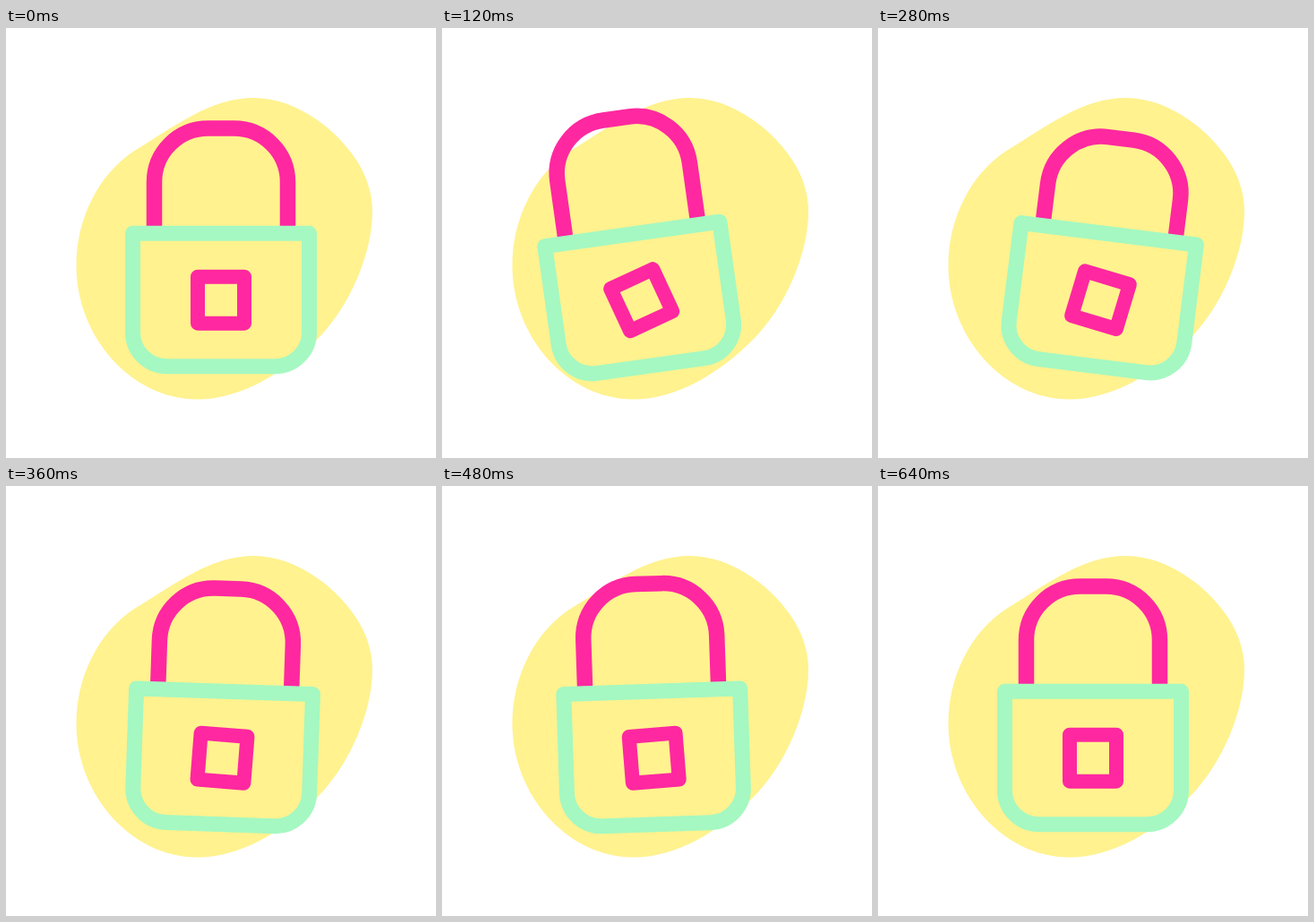
An HTML page with a canvas for the animation above (0.68 s loop, 480 by 480 pixels).

```html
<!DOCTYPE html>
<html lang="en">
<head>
<meta charset="utf-8">
<title>Padlock shake</title>
<style>
  html, body { margin: 0; width: 100%; height: 100%; overflow: hidden; background: #fff; }
  canvas { display: block; width: 480px; height: 480px; }
</style>
</head>
<body>
<canvas id="stage" width="480" height="480"></canvas>
<script>
const ctx = document.getElementById('stage').getContext('2d');

const YELLOW = '#fff28f', MINT = '#a5f8c1', PINK = '#ff28a0';
const LOOP = 680, STEP = 40, HELD_STEP = 13;
const CENTER = { x: 240, y: 303.7 };

const blob = new Path2D(
  'M277 78 C325 78 372 115 394 152 C404 169 409 187 409 205' +
  'C409 250 385 310 347 348 C310 385 262 414.5 214 414.5' +
  'C140 414.5 78.5 345 78.5 265 C78.5 215 102 163 145 136' +
  'C190 109 228 78 277 78 Z');

// Lock parts are drawn around the centre of the lock.
const body = new Path2D('M-98.5 -74.5 H98.5 V36 A38 38 0 0 1 60.5 74 H-60.5 A38 38 0 0 1 -98.5 36 Z');
const keyhole = new Path2D('M-26 -26 H26 V26 H-26 Z');

const smooth = u => (1 - Math.cos(Math.PI * u)) / 2;
const settle = u => 1 - Math.pow(1 - u, 1.8);

// Each key eases in from the one before it.
const keys = [
  { at: 0, shift: 0, tilt: 0, spin: 0, lift: 0 },
  { at: 3, shift: -17.3, tilt: -8, spin: -25, lift: 13, ease: smooth },
  { at: 7, shift: 8.5, tilt: 7.1, spin: 16.7, lift: -10, ease: smooth },
  { at: 11, shift: -5.5, tilt: -3.2, spin: -7.7, lift: -(-5), ease: smooth },
  { at: 15, shift: 0, tilt: 0, spin: 0, lift: 0, ease: settle }
];

function poseAt(time) {
  const slot = Math.floor((time % LOOP) / STEP);
  const tick = slot < HELD_STEP ? slot : slot - 1;
  const i = Math.max(1, keys.findIndex(key => key.at >= tick));
  const from = keys[i - 1], to = keys[i];
  const u = to.ease((tick - from.at) / (to.at - from.at));
  const mix = name => from[name] + (to[name] - from[name]) * u;
  return { shift: mix('shift'), tilt: mix('tilt'), spin: mix('spin'), lift: mix('lift') };
}

function shackle(lift) {
  const top = -191.7 - lift;
  const path = new Path2D();
  path.moveTo(-74.5, -68);
  path.arcTo(-74.5, top, 0, top, 60);
  path.arcTo(74.5, top, 74.5, -68, 60);
  path.lineTo(74.5, -68);
  return path;
}

function stroke(path, color, width) {
  ctx.strokeStyle = color;
  ctx.lineWidth = width;
  ctx.stroke(path);
}

function rotate(degrees) {
  ctx.rotate(degrees * Math.PI / 180);
}

function draw(time) {
  const pose = poseAt(time);
  ctx.fillStyle = '#fff';
  ctx.fillRect(0, 0, 480, 480);
  ctx.fillStyle = YELLOW;
  ctx.fill(blob);

  ctx.save();
  ctx.lineJoin = 'round';
  ctx.translate(CENTER.x + pose.shift, CENTER.y);
  rotate(pose.tilt);
  stroke(shackle(pose.lift), PINK, 17.5);
  stroke(body, MINT, 17);
  rotate(pose.spin - pose.tilt);
  stroke(keyhole, PINK, 16);
  ctx.restore();
}

const start = performance.now();
function tick() {
  draw(performance.now() - start);
  requestAnimationFrame(tick);
}
tick();
</script>
</body>
</html>
```
